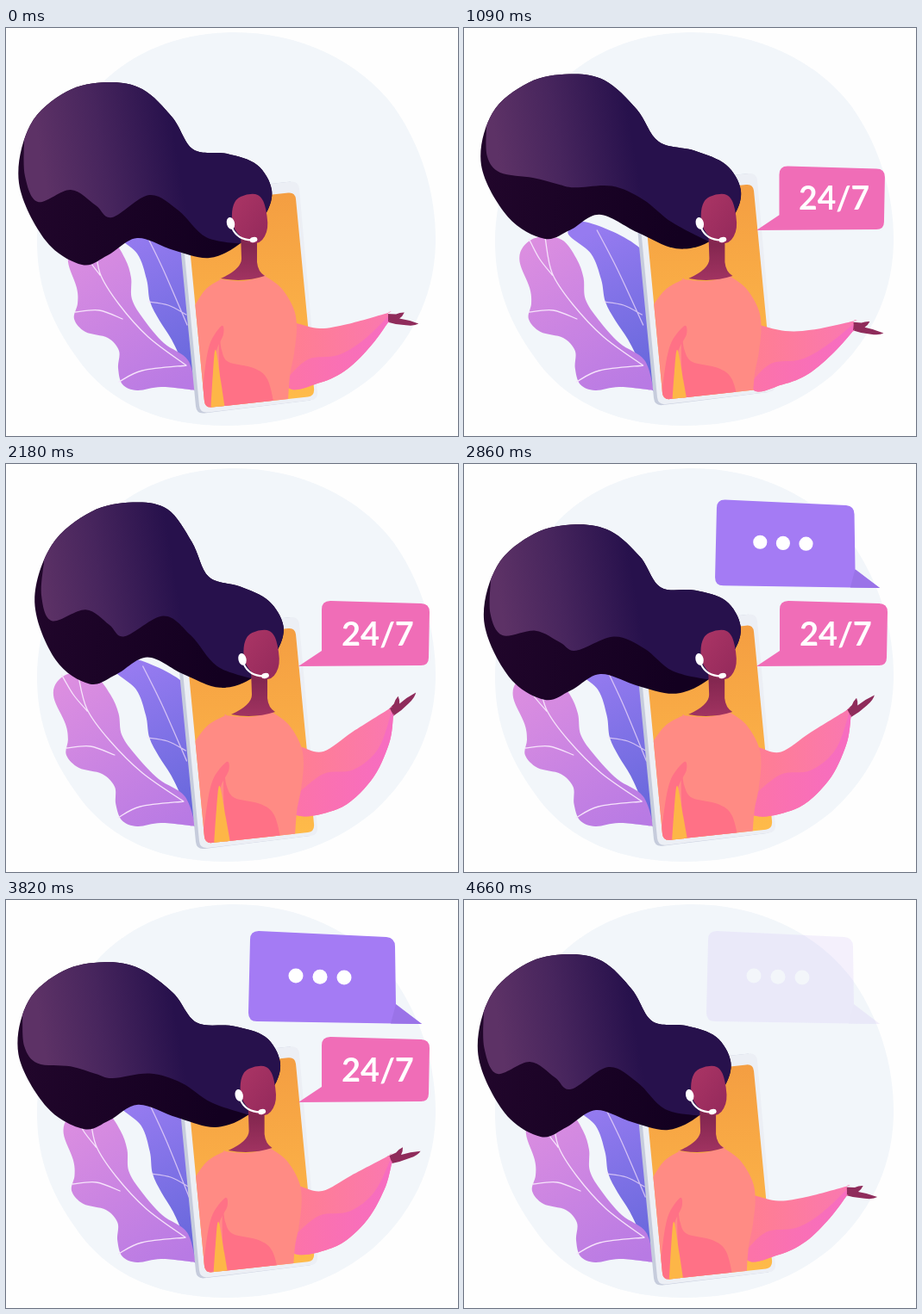
Recreate the animation shown at these times as an HTML page. Size 524 by 474 pixels, loop 4.73 s.

```html
<!DOCTYPE html>
<html lang="en">
<head>
<meta charset="utf-8">
<title>Support agent</title>
<style>
html, body { margin: 0; width: 100%; height: 100%; overflow: hidden; background: #fefefe; }
svg { display: block; width: 524px; height: 474px; }
.vein { fill: none; stroke: #f6e3fb; stroke-width: 1.3; stroke-linecap: round; }
text { font: 700 38px Lato, sans-serif; fill: #fff; }
</style>
</head>
<body>
<svg viewBox="0 0 524 474">
  <defs>
    <linearGradient id="gHair" gradientUnits="userSpaceOnUse" x1="40" y1="150" x2="195" y2="125">
      <stop stop-color="#5d3266"/><stop offset=".45" stop-color="#47255d"/><stop offset="1" stop-color="#27114c"/>
    </linearGradient>
    <linearGradient id="gDark" gradientUnits="userSpaceOnUse" x1="20" y1="200" x2="250" y2="230">
      <stop stop-color="#21062b"/><stop offset="1" stop-color="#130020"/>
    </linearGradient>
    <linearGradient id="gLeaf" gradientUnits="userSpaceOnUse" x1="80" y1="245" x2="200" y2="420">
      <stop stop-color="#dc8ee0"/><stop offset="1" stop-color="#b87ae4"/>
    </linearGradient>
    <linearGradient id="gLeaf2" gradientUnits="userSpaceOnUse" x1="140" y1="240" x2="215" y2="400">
      <stop stop-color="#967bf0"/><stop offset="1" stop-color="#6868dc"/>
    </linearGradient>
    <linearGradient id="gScreen" x1="0" y1="0" x2="0" y2="1">
      <stop stop-color="#f49e42"/><stop offset="1" stop-color="#ffbc4a"/>
    </linearGradient>
    <linearGradient id="gArm" gradientUnits="userSpaceOnUse" x1="335" y1="0" x2="448" y2="0">
      <stop stop-color="#ff7e92"/><stop offset="1" stop-color="#fa78b0"/>
    </linearGradient>
    <linearGradient id="gFold" gradientUnits="userSpaceOnUse" x1="335" y1="0" x2="440" y2="0">
      <stop stop-color="#fc73a9"/><stop offset="1" stop-color="#f76dc0"/>
    </linearGradient>
    <linearGradient id="gNeck" x1="0" y1="0" x2="0" y2="1">
      <stop offset=".25" stop-color="#842750"/><stop offset="1" stop-color="#a13361"/>
    </linearGradient>
    <linearGradient id="gFace" x1="0" y1="0" x2="1" y2="1">
      <stop stop-color="#ab3565"/><stop offset="1" stop-color="#93295b"/>
    </linearGradient>
    <clipPath id="cHair"><path class="hair"/></clipPath>
    <clipPath id="cArm"><path class="arm"/></clipPath>
    <clipPath id="cScreen"><path class="phone" d="M217,203L327,191Q335,190 336,198L357,418Q358,427 350,428L239,440Q231,441 230,433L209,212Q208,204 217,203Z"/></clipPath>
  </defs>

  <path fill="#f2f6fa" d="M265,5C340,5 410,38 450,92C482,138 498,192 498,246C498,310 470,365 425,405C380,442 325,462 255,462C185,462 120,440 80,380C52,340 36,300 36,248C36,190 60,120 110,65C150,25 205,5 265,5Z"/>

  <path id="leaf2" fill="url(#gLeaf2)"/>
  <path id="veins2" class="vein" stroke-opacity=".7"/>
  <path id="leaf" fill="url(#gLeaf)"/>
  <path id="veins" class="vein"/>

  <g class="phone">
    <path fill="#c6ccdc" d="M206,191L330,178L353,432L230,447Q221,448 220,439L197,200Q196,192 206,191Z"/>
    <path fill="#eceff5" d="M210,191L330,178Q339,177 340,186L361,422Q362,431 353,432L234,446Q225,447 224,438L201,200Q200,192 210,191Z"/>
    <path fill="url(#gScreen)" d="M217,203L327,191Q335,190 336,198L357,418Q358,427 350,428L239,440Q231,441 230,433L209,212Q208,204 217,203Z"/>
  </g>

  <path id="hand" fill="#8f2c5b" d="M-3,-4L8,-6Q12,-9 17,-10Q16,-5 13,-2Q24,-3 36,-1Q32,3 22,4Q10,6 -3,5Z"/>
  <path class="arm" fill="url(#gArm)"/>
  <g clip-path="url(#cArm)"><path id="fold" fill="url(#gFold)"/></g>

  <g clip-path="url(#cScreen)">
    <path id="torso" fill="#ff8b84"/>
    <path id="belly" fill="#ff7186"/>
    <path id="sleeve" fill="#ff7186"/>
    <path id="gap" fill="#fdb647"/>
  </g>

  <path class="hair" fill="url(#gDark)"/>
  <g clip-path="url(#cHair)"><path id="shine" fill="url(#gHair)"/></g>

  <path id="neck" fill="url(#gNeck)" d="M272,238L273,268Q273,280 249,291Q276,296 300,288Q292,283 291,272L291,240Z"/>
  <g id="head">
    <path fill="url(#gFace)" d="M262,222Q261,201 272,196Q281,192 289,193Q298,195 301,210Q305,228 302,237Q298,249 290,250Q282,251 273,243Q263,235 262,222Z"/>
    <path fill="none" stroke="#fff" stroke-width="2" d="M262,232Q268,246 285,246.500"/>
    <ellipse cx="260.500" cy="227" rx="4.600" ry="7" fill="#fff" transform="rotate(-14 260 227)"/>
    <ellipse cx="287" cy="246" rx="4.500" ry="3" fill="#fff" transform="rotate(-12 287 246)"/>
  </g>

  <g id="pink">
    <path fill="#f06db7" d="M376,159L481,162Q491,162 491,172L490,225Q490,234 481,234L339,235L366,217L366,169Q366,159 376,159Z"/>
    <text x="431" y="211" text-anchor="middle">24/7</text>
  </g>
  <g id="violet">
    <path fill="#a47bf4" d="M293,36L441,43Q451,44 451,54L452,122L482,144L291,141Q281,141 281,131L283,46Q283,36 293,36Z"/>
    <path fill="#9a73e8" d="M452,121L482,144L446,143.400Z"/>
    <g fill="#fff"><circle cx="336" cy="88" r="8.500"/><circle cx="364" cy="89.200" r="8.500"/><circle cx="392" cy="90" r="8.500"/></g>
  </g>
</svg>

<script>
const LOOP = 4730, STEPS = 69, STEP = LOOP / STEPS;

// Key values over the loop; the rest of the motion follows from sine waves.
const keys = [0, 7, 16, 32, 42, 56, 68];
const tracks = {
  rise: [0, -19, -20, -19, 3, 0, 0],
  drift: [0, -5, 0, 26, 9, -7, 2],
  lean: [0, 0, 0.95, 1, 0.93, 0.72, 0.09],
  reach: [0, 0.02, -0.2, 1, 0.97, 0.73, -0.03]
};

const hair = [117,63, 158,71, 193,104, 217,141, 256,146, 291,159, 308,188, 300,218, 272,250,
              236,267, 194,258, 152,244, 118,264, 88,275, 46,247, 15,180, 28,113, 70,74];
const wave = [21,132, 22,172, 37,202, 75,188, 104,206, 123,220, 166,194, 200,212, 232,243, 275,251];

// Doubled points make corners.
const armDown = [325,340, 337,343, 364,349, 396,344, 443,331, 443,331, 443,342, 443,342, 424,368, 396,396, 364,412, 325,415];
const armUp = [327,326, 335,329, 360,334, 394,311, 437,284, 437,284, 441,292, 441,292, 436,325, 415,368, 376,401, 322,403];
const foldDown = [448,330, 415,362, 385,380, 350,385, 325,408];
const foldUp = [440,284, 424,330, 395,355, 360,360, 328,385];

const plants = {
  leaf: [72,272, 82,302, 83,320, 79,338, 92,353, 118,360, 131,375, 130,395, 135,414, 152,421, 180,417, 220,421,
         220,421, 211,386, 183,366, 160,339, 146,315, 145,290, 138,268, 122,246, 95,243, 77,254],
  leaf2: [126,238, 152,262, 163,292, 167,318, 178,340, 192,362, 206,392, 216,418, 232,420, 228,330, 215,262, 150,226]
};
const veins = {
  leaf: [[103,245, 109,285, 131,321, 165,359, 209,392], [84,245, 95,268, 109,287],
         [80,330, 108,328, 135,338], [131,411, 158,398, 209,392]],
  leaf2: [[160,235, 182,280, 210,345], [165,318, 188,322, 209,333]]
};

const body = {
  torso: [205,345, 219,322, 232,303, 249,292, 249,292, 275,294, 300,288, 300,288, 319,302, 333,325,
          337,347, 334,378, 329,405, 326,450, 326,450, 205,450, 205,450],
  belly: [247,352, 250,374, 258,388, 287,395, 303,408, 311,440, 311,460, 256,460, 248,410],
  sleeve: [226,450, 229,410, 236,368, 250,346, 252,356, 244,375, 240,405, 237,450],
  gap: [243,374, 240,400, 237,450, 237,450, 255,450, 255,450, 249,410]
};

const $ = s => document.querySelector(s);
const setAll = (s, name, value) => document.querySelectorAll(s).forEach(e => e.setAttribute(name, value));
const clamp = v => Math.min(1, Math.max(0, v));
const smooth = s => s * s * (3 - 2 * s);
const lerp = (a, b, s) => a.map((v, i) => v + (b[i] - v) * s);
const moveX = (p, f) => p.map((v, i) => i % 2 ? v : v + f(v, p[i + 1]));

// Smooth curve through a flat list of x, y pairs.
function curve(p, closed) {
  const n = p.length / 2;
  const at = (i, c) => p[2 * (closed ? (i + n) % n : Math.min(n - 1, Math.max(0, i))) + c];
  const ctrl = (i, k) => [0, 1].map(c => (at(i, c) + k * (at(i + 1, c) - at(i - 1, c)) / 6).toFixed(2));
  let d = `M${p[0]},${p[1]}`;
  for (let i = 0; i < (closed ? n : n - 1); i++)
    d += `C${ctrl(i, 1)} ${ctrl(i + 1, -1)} ${at(i + 1, 0)},${at(i + 1, 1)}`;
  return closed ? d + 'Z' : d;
}

// Periodic cubic through the key values.
function track(values, u) {
  const n = keys.length;
  const val = k => values[(k + n) % n];
  const time = k => keys[(k + n) % n] + STEPS * Math.floor(k / n);
  const slope = k => (val(k + 1) - val(k - 1)) / (time(k + 1) - time(k - 1));
  const i = keys.filter(k => k <= u).length - 1;
  const h = time(i + 1) - time(i), s = (u - time(i)) / h;
  return val(i) + (val(i + 1) - val(i)) * smooth(s)
    + h * s * (1 - s) * (slope(i) * (1 - s) - slope(i + 1) * s);
}

// Loose hair floats and flattens; the part near the face follows the head.
function float(p, squash, rise, drift, headX) {
  const out = [];
  for (let i = 0; i < p.length; i += 2) {
    const x = p[i], y = p[i + 1], loose = clamp((280 - x) / 120);
    out.push(x + loose * (drift * (360 - y) / 260 + 5 * squash) + (1 - loose) * headX,
             y + loose * (rise + (170 - y) * 0.1 * squash));
  }
  return out;
}

// Pulls each inner point towards the height of its neighbours.
const calm = (p, k) => p.map((v, i) =>
  i % 2 && i > 1 && i < p.length - 2 ? v + k * ((p[i - 2] + p[i + 2]) / 2 - v) : v);

// Bubble scale: overshoot, dip, settle.
function pop(t) {
  if (t < 340) return 1.053 * smooth(clamp(t / 340));
  if (t < 590) return 1.053 - 0.103 * smooth((t - 340) / 250);
  return 0.95 + 0.05 * smooth(clamp((t - 590) / 190));
}

function bubble(id, x, y, t, start, fade) {
  const e = $(id);
  e.setAttribute('transform', `translate(${x} ${y}) scale(${pop(t - start)}) translate(${-x} ${-y})`);
  e.setAttribute('opacity', 1 - clamp((t - fade) / 420));
}

function plant(name, swing) {
  const sway = p => moveX(p, (x, y) => swing * (420 - y) / 160);
  $('#' + name).setAttribute('d', curve(sway(plants[name]), true));
  $('#' + name.replace('leaf', 'veins')).setAttribute('d', veins[name].map(l => curve(sway(l))).join(''));
}

function draw(u) {
  const t = u * STEP, angle = 2 * Math.PI * u / STEPS;
  const squash = (1 - Math.cos(2 * angle)) / 2;
  const [rise, drift, lean, reach] = Object.values(tracks).map(v => track(v, u));
  const bodyX = 8 * lean, headX = 13.5 * lean;

  plant('leaf', -9 * (1 - Math.cos(angle)));
  plant('leaf2', -5 * Math.sin(angle));
  setAll('.phone', 'transform', `translate(0 ${0.5 - 9.5 * squash})`);
  setAll('#neck', 'transform', `translate(${12 * lean} 0)`);
  setAll('#head', 'transform', `translate(${headX} 0)`);

  const arm = moveX(lerp(armDown, armUp, reach), () => bodyX);
  const fold = moveX(lerp(foldDown, foldUp, reach), () => bodyX);
  setAll('.arm', 'd', curve(arm, true));
  $('#fold').setAttribute('d', curve(fold) + 'L300,440L480,440Z');
  const wristX = (arm[8] + arm[12]) / 2, wristY = (arm[9] + arm[13]) / 2;
  $('#hand').setAttribute('transform',
    `translate(${wristX} ${wristY}) rotate(${13 - 50 * reach * Math.abs(reach)})`);

  for (const id in body)
    $('#' + id).setAttribute('d', curve(moveX(body[id], x => bodyX * clamp((x - 217) / 45)), true));

  const flow = p => float(p, squash, rise, drift, headX);
  const edge = flow(calm(wave, 0.55 * squash));
  setAll('.hair', 'd', curve(flow(hair), true));
  $('#shine').setAttribute('d', curve(edge) + `L400,250L400,0L0,0L0,${edge[1] - 35}Z`);

  bubble('#pink', 340, 235, t, 400, 3930);
  bubble('#violet', 482, 144, t, 2289, 4283);
}

const begin = performance.now();
function tick() {
  const t = (performance.now() - begin) % LOOP;
  draw(Math.floor((t + 20) / STEP) % STEPS);
  requestAnimationFrame(tick);
}
tick();
</script>
</body>
</html>
```
